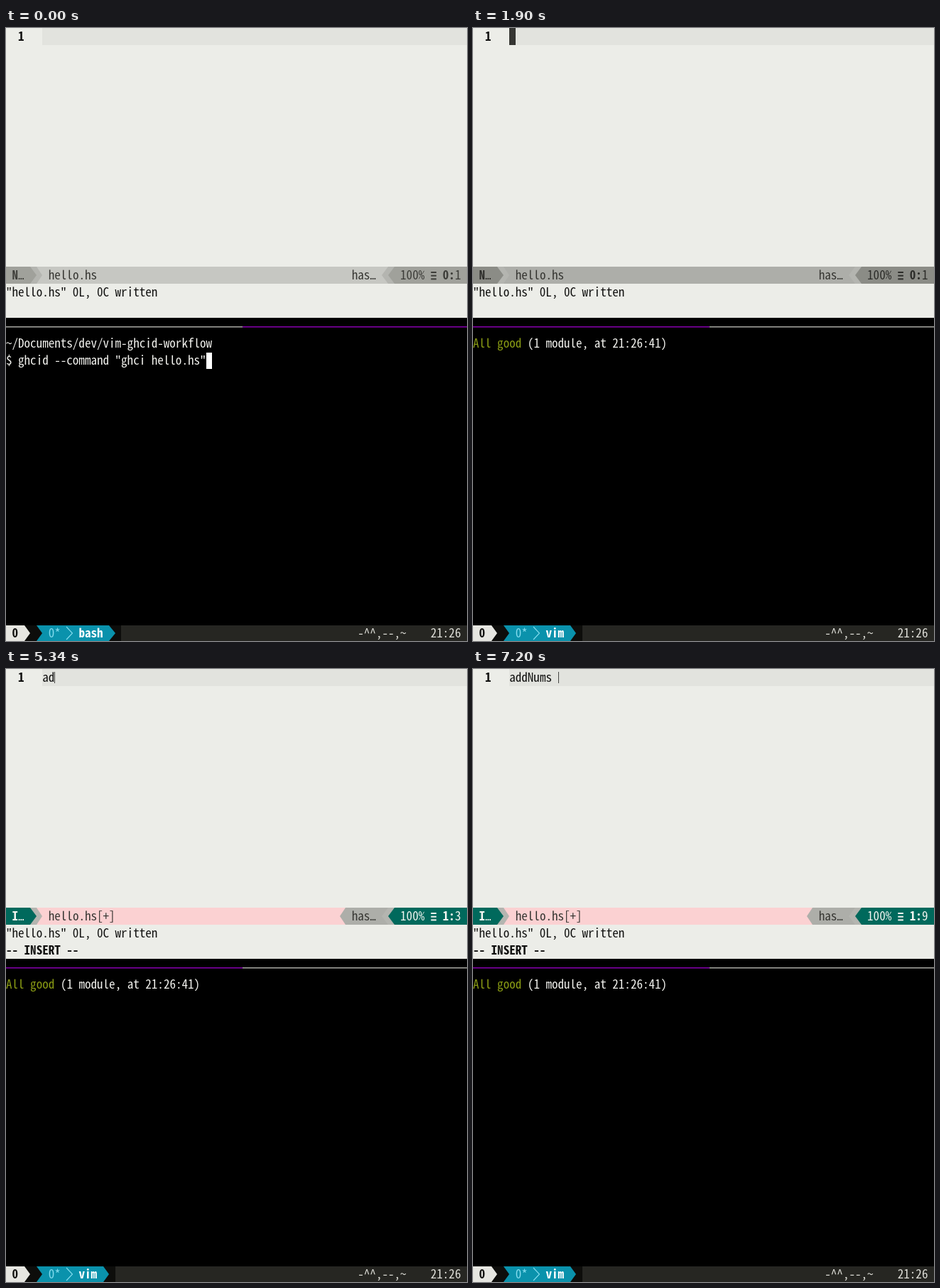
Animation of 649x863 px, one loop 8 s. Source, as an HTML page with a canvas:

```html
<!DOCTYPE html>
<html lang="en">
<head>
<meta charset="utf-8">
<title>ghcid workflow</title>
<style>
  html, body { margin: 0; width: 100%; height: 100%; overflow: hidden; background: #000; }
  canvas { display: block; width: 649px; height: 863px; }
</style>
</head>
<body>
<canvas id="stage" width="649" height="863"></canvas>
<script>
const ctx = document.getElementById('stage').getContext('2d');
const W = 649, H = 863, LOOP = 8000;
const COLS = 76, CW = W / COLS, RH = 24, BASE = 18;
const FACE = '"Noto Sans Mono CJK JP", "Noto Sans Mono", "DejaVu Sans Mono", monospace';
const PAPER = '#ecede8', INK = '#10100f', TERM = '#f2f2ee';

// Choose the font size whose advance equals one cell.
ctx.font = `100px ${FACE}`;
const SIZE = 100 * CW / ctx.measureText('0').width;

const THEMES = {
  idle:   { a: '#a0a19b', b: '#b4b5b0', bar: '#c6c7c2', ink: '#3c3c38', mode: 'N' },
  normal: { a: '#8b8c86', b: '#b4b5b0', bar: '#adaea9', ink: '#2c2c29', mode: 'N' },
  insert: { a: '#00695c', b: '#b4b5b0', bar: '#adaea9', ink: '#f4f4f0', mode: 'I' }
};

// When each typed text starts to show.
const TYPED = [
  [4840, 'a'], [5340, 'ad'], [5500, 'add'], [6170, 'addN'],
  [6440, 'addNu'], [6640, 'addNum'], [6840, 'addNums'], [7200, 'addNums ']
];
const MENU_TIMES = [[4900, 5340], [6740, 7200]];
const MENU = [
  ['addNumber ()~', 'S', 7], ['addNumbers', '', 7], ['addNumberOf', '', 6],
  ['addNumericField', '', 3], ['addNumber()~', 'S', 5]
];

const colX = c => Math.round(c * CW);

function rect(x, y, w, h, color) {
  ctx.fillStyle = color;
  ctx.fillRect(x, y, w, h);
}

function cells(from, to, y, h, color) {
  rect(colX(from), y, colX(to) - colX(from), h, color);
}

function text(str, col, y, color, bold) {
  ctx.font = `${bold ? 700 : 400} ${SIZE}px ${FACE}`;
  ctx.fillStyle = color;
  ctx.fillText(str, col * CW, y + BASE);
}

// One-cell triangle; dir 1 points right, -1 points left.
function arrow(col, y, h, color, dir) {
  const flat = colX(dir > 0 ? col : col + 1);
  const tip = colX(dir > 0 ? col + 1 : col);
  ctx.fillStyle = color;
  ctx.beginPath();
  ctx.moveTo(flat, y);
  ctx.lineTo(tip, y + h / 2);
  ctx.lineTo(flat, y + h);
  ctx.fill();
}

function ellipsis(col, y, color) {
  for (let i = 0; i < 3; i++) rect(col * CW + 0.6 + i * 2.8, y + BASE - 2, 1.7, 2, color);
}

function menuIcon(col, y, color) {
  for (let i = 0; i < 3; i++) rect(col * CW + 0.5, y + 7 + i * 4.7, 7.6, 2, color);
}

function statusLine(theme, typed) {
  const y = 14 * RH, { a, b, bar, ink, mode } = theme;
  const dark = '#363632';
  cells(0, COLS, y, RH, typed ? '#fbd1d2' : bar);
  if (typed) {
    arrow(55, y, RH, bar, -1);
    cells(56, COLS, y, RH, bar);
  }
  cells(0, 5, y, RH, b);
  arrow(5, y, RH, b, 1);
  cells(0, 4, y, RH, a);
  arrow(4, y, RH, a, 1);
  arrow(62, y, RH, b, -1);
  cells(63, COLS, y, RH, b);
  arrow(63, y, RH, a, -1);
  cells(64, COLS, y, RH, a);

  text(mode, 1, y, ink, true);
  ellipsis(2, y, ink);
  text('hello.hs' + (typed ? '[+]' : ''), 7, y, dark);
  text('has', 57, y, dark);
  ellipsis(60, y, dark);
  text('100%', 65, y, ink);
  menuIcon(70, y, ink);
  text(typed ? '1:' : '0:', 72, y, ink, true);
  text(String(typed.length + 1), 74, y, ink);
}

function popup() {
  cells(5, 33, RH, MENU.length * RH, '#cdcec9');
  MENU.forEach(([word, kind, score], i) => {
    const y = (i + 1) * RH;
    text(word, 6, y, INK);
    text(kind, 22, y, INK);
    text(`${score}% [TN]`, 25, y, INK);
  });
}

function editor(t) {
  const insert = t >= 2540;
  const theme = insert ? THEMES.insert : t >= 1370 ? THEMES.normal : THEMES.idle;
  const typed = TYPED.reduce((now, [at, str]) => t >= at ? str : now, '');

  rect(0, 0, W, 17 * RH, PAPER);
  cells(6, COLS, 0, RH, '#e2e3de');
  text('1', 2, 0, INK, true);
  text(typed, 6, 0, INK);
  if (insert) rect(colX(6 + typed.length), 4, 1, 16, '#454542');
  else if (t >= 1370) cells(6, 7, 0, RH, '#353532');
  if (MENU_TIMES.some(([from, to]) => t >= from && t < to)) popup();

  statusLine(theme, typed);
  text('"hello.hs" 0L, 0C written', 0, 15 * RH, INK);
  if (insert) text('-- INSERT --', 0, 16 * RH, INK, true);
}

function cursor(col, row) {
  cells(col, col + 1, row * RH + 1, RH - 1, '#fff');
}

function terminal(t) {
  const line = 18 * RH;
  if (t < 600) {
    text('~/Documents/dev/vim-ghcid-workflow', 0, line, TERM);
    text('$ ghcid --command "ghci hello.hs"', 0, line + RH, TERM);
    if (t < 500) cursor(33, 19);
    else if (t < 550) cursor(0, 20);
    else {
      text('GHCi, version 8.0.1: http://www.haskell.org/ghc/  :? for help', 0, line + 2 * RH, TERM);
      cursor(0, 21);
    }
    return;
  }
  text('All good', 0, line, '#8a9c14');
  text('(1 module, at 21:26:41)', 9, line, TERM);
  if (t < 1300) cursor(0, 34);
}

function divider(t) {
  const grey = '#a9a9a4', purple = '#8700af', top = t >= 1300;
  cells(0, 39, 420, 1.5, top ? purple : grey);
  cells(39, COLS, 420, 1.5, top ? grey : purple);
}

function bottomBar(t) {
  const y = 841, h = 22, row = 35 * RH;
  const name = t < 1900 ? 'bash' : 'vim';
  const end = 13 + name.length;
  const teal = '#0a92ac', gap = '#0d0d0b', light = '#e6e6e1';

  cells(0, COLS, y, h, '#262622');
  cells(0, end + 2, y, h, gap);
  cells(0, 3, y, h, light);
  arrow(3, y, h, light, 1);
  text('0', 1, row, INK, true);

  cells(5, end, y, h, teal);
  arrow(5, y, h, gap, 1);
  arrow(end, y, h, teal, 1);
  text('0*', 7, row, '#84dcee');
  ctx.strokeStyle = '#84dcee';
  ctx.lineWidth = 1.1;
  ctx.beginPath();
  ctx.moveTo(colX(10), y + 2);
  ctx.lineTo(colX(11) - 0.5, y + h / 2);
  ctx.lineTo(colX(10), y + h - 2);
  ctx.stroke();
  text(name, 12, row, '#fff', true);

  text('-^^,--,~', 58, row, '#deded8');
  text('21:26', 70, row, '#deded8');
}

function draw(t) {
  rect(0, 0, W, H, '#000');
  editor(t);
  divider(t);
  terminal(t);
  bottomBar(t);
}

const start = performance.now();
function tick() {
  draw((performance.now() - start) % LOOP);
  requestAnimationFrame(tick);
}
tick();
</script>
</body>
</html>
```
